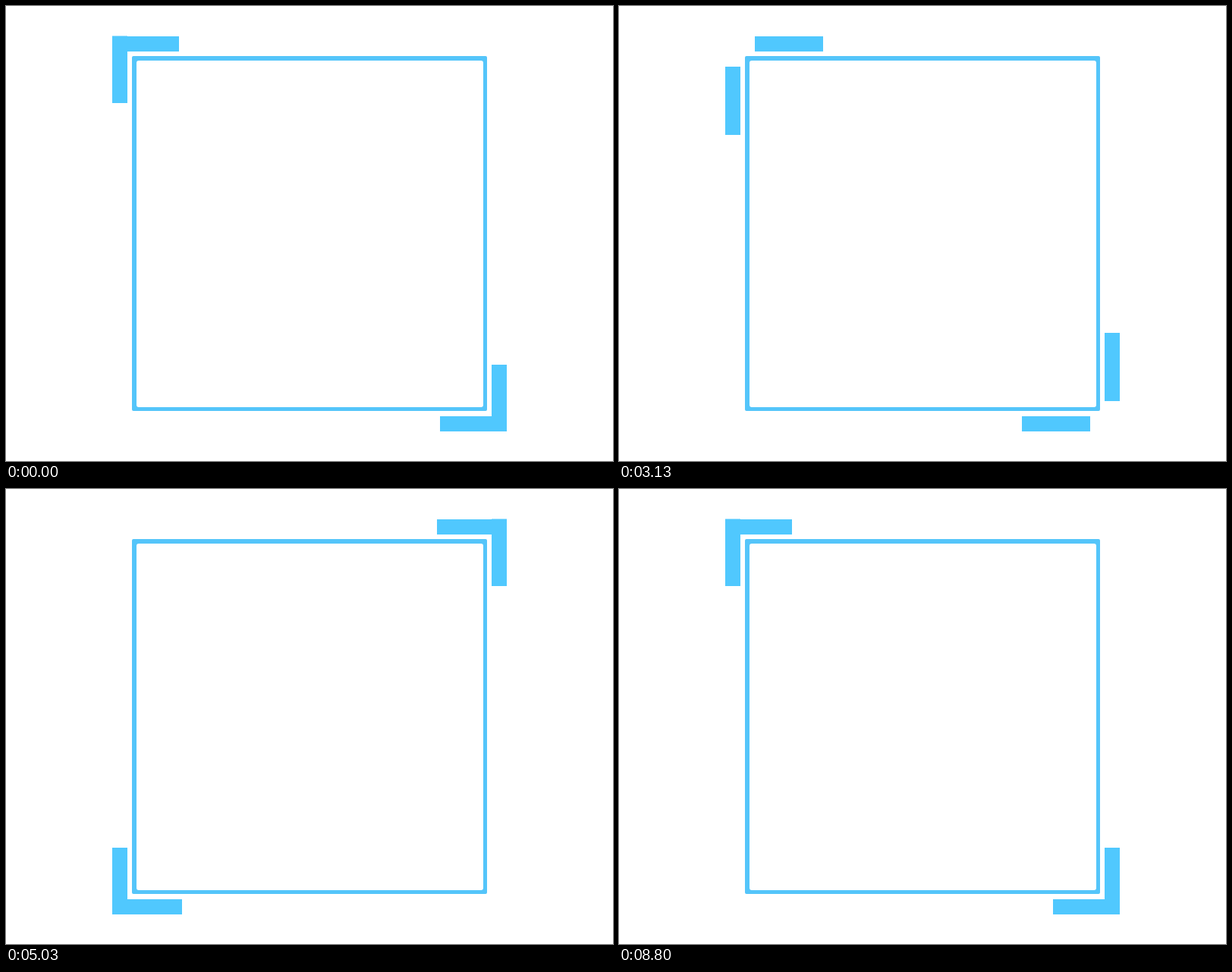
Recreate the animation shown at these times as an HTML page. Size 800x600 px, loop 9030 ms.

```html
<!DOCTYPE html>
<html lang="en">
<head>
<meta charset="utf-8">
<title>Sliding corner frame</title>
<style>
  html, body { margin: 0; width: 100%; height: 100%; overflow: hidden; background: #fff; }
  svg { display: block; width: 100%; height: 100%; }
</style>
</head>
<body>
<svg viewBox="0 0 800 600">
  <clipPath id="bounds"><rect x="140" y="39.5" width="520" height="521.5"/></clipPath>
  <rect x="166" y="66" width="468" height="468" rx="2" fill="#54c5fa"/>
  <rect x="172" y="72" width="457" height="457" rx="3" fill="#fff"/>
  <g clip-path="url(#bounds)" fill="#50c8fe">
    <rect id="top" y="40" width="90" height="20"/>
    <rect id="bottom" y="541" width="90" height="20"/>
    <rect id="left" x="140" width="20" height="90"/>
    <rect id="right" x="640" width="20" height="90"/>
  </g>
</svg>
<script>
const LOOP = 9030;
const TICK = 50;            // the picture advances 20 times a second
const CYCLE_TICKS = 90;
const RETURN_TICK = 57;
const RETURN_END = 66;
const DURATION = 500;
const LEAD = 15;            // time already elapsed at the first moving tick

const bars = [
  { id: 'top', axis: 'x', from: 138, to: 568 },
  { id: 'bottom', axis: 'x', from: 572, to: 142 },
  { id: 'left', axis: 'y', from: 38, to: 473 },
  { id: 'right', axis: 'y', from: 473, to: 38 }
].map(bar => ({ ...bar, node: document.getElementById(bar.id) }));

const bezier = (a, b, s) => 3 * a * s * (1 - s) ** 2 + 3 * b * s * s * (1 - s) + s ** 3;

function ease(x) {
  if (x <= 0) return 0;
  if (x >= 1) return 1;
  let low = 0, high = 1;
  for (let i = 0; i < 24; i++) {
    const mid = (low + high) / 2;
    if (bezier(0.25, 0.25, mid) < x) low = mid; else high = mid;
  }
  return bezier(0.1, 1, low);
}

const slide = ticks => ease((LEAD + ticks * TICK) / DURATION);

function progress(tick) {
  if (tick === 0 || tick >= RETURN_END) return 0;
  return tick < RETURN_TICK ? slide(tick - 1) : 1 - slide(tick - RETURN_TICK);
}

// 20 ticks a second shown on a 30 Hz grid.
function tickAt(time) {
  const slot = Math.floor((time + 3.4) * 0.03);
  return Math.round(slot * 2 / 3) % CYCLE_TICKS;
}

function draw(time) {
  const p = progress(tickAt(time % LOOP));
  for (const { node, axis, from, to } of bars) {
    node.setAttribute(axis, Math.round(from + (to - from) * p));
  }
}

const start = performance.now();
function frame() {
  draw(performance.now() - start);
  requestAnimationFrame(frame);
}
frame();
</script>
</body>
</html>
```
